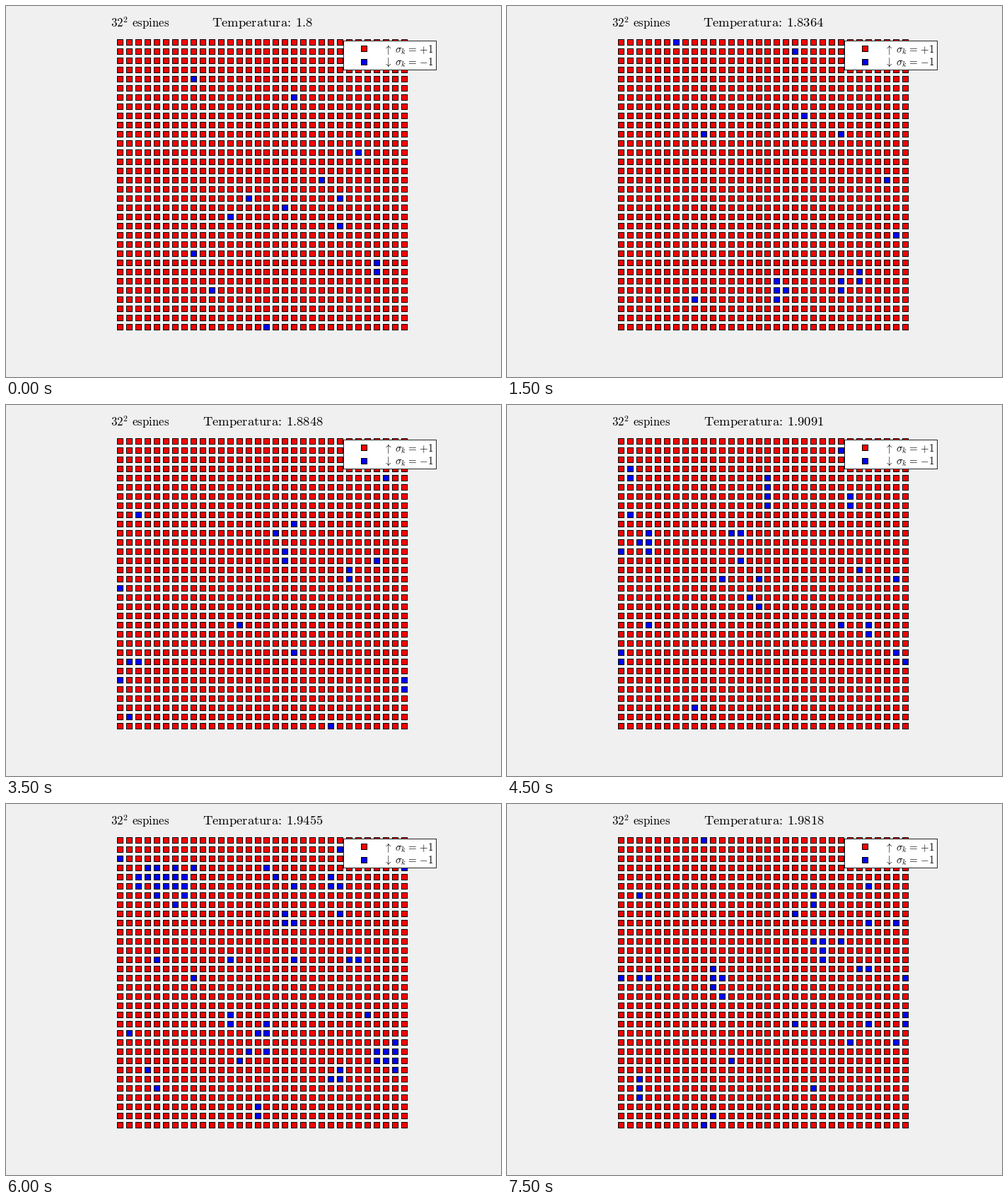
A matplotlib script for the animation above (8000 ms loop, 700x525 px).

```python
import numpy as np
import matplotlib.pyplot as plt
from matplotlib.animation import FuncAnimation
from matplotlib.collections import PolyCollection

W, H, DPI = 700, 525, 100
N, FRAMES, INTERVAL, SWEEPS = 32, 16, 500, 40
BG, RED, BLUE = "#f0f0f0", "#ff0000", "#0000ff"

plt.rcParams["mathtext.fontset"] = "cm"

# (column, row) of the spins that point down at the start
START_DOWN = [(8, 4), (19, 6), (26, 12), (22, 15), (14, 17), (24, 17), (18, 18),
              (12, 19), (24, 20), (8, 23), (28, 24), (28, 25), (10, 27), (16, 31)]


def temperature(k):
    return 1.8 + 1.2 * k / 99


def sweep(spins, temp, rng):
    """One heat-bath pass over both sublattices of a periodic lattice."""
    parity = np.indices(spins.shape).sum(axis=0) % 2
    for p in (0, 1):
        field = sum(np.roll(spins, d, axis) for d in (1, -1) for axis in (0, 1))
        up = rng.random(spins.shape) < 1 / (1 + np.exp(-2 * field / temp))
        spins = np.where(parity == p, np.where(up, 1, -1), spins)
    return spins


def simulate():
    rng = np.random.default_rng(32)
    spins = np.ones((N, N), int)
    for col, row in START_DOWN:
        spins[row, col] = -1
    states = [spins]
    for k in range(1, FRAMES):
        for _ in range(SWEEPS):
            spins = sweep(spins, temperature(k), rng)
        states.append(spins)
    return states


def box(x0, y0, x1, y1):
    return [(x0, y0), (x1, y0), (x1, y1), (x0, y1)]


def square(x, y, r):
    """Pixel-aligned square reaching r pixels around pixel (x, y)."""
    return box(x - r, y - r, x + r + 1, y + r + 1)


def fill(polys, color, z):
    return ax.add_collection(
        PolyCollection(polys, facecolors=color, edgecolors="none", linewidths=0, zorder=z),
        autolim=False)


def label(x, y, s, px, **kw):
    return ax.text(x, y, s, fontsize=px * 72 / DPI, color="black",
                   va="baseline", zorder=6, **kw)


def title_text(k):
    return (r"$\mathrm{Temperatura\hspace{-0.2}:\hspace{0.2}%s}$"
            % f"{temperature(k):.5g}")


fig = plt.figure(figsize=(W / DPI, H / DPI), dpi=DPI, facecolor=BG)
ax = fig.add_axes([0, 0, 1, 1])
ax.set(xlim=(0, W), ylim=(H, 0))
ax.axis("off")

centers = [(161 + round(402 / 31 * c), 51 + 13 * r) for r in range(N) for c in range(N)]
fill([square(x, y, 4) for x, y in centers], "black", 1)
cells = fill([square(x, y, 3) for x, y in centers], RED, 2)

title = label(363, 29.5, title_text(0), 18.6, ha="center")
label(148.5, 30, r"$\mathrm{32^2\hspace{0.4}espines}$", 16.8, ha="left")

# Legend
fill([box(477, 49, 609, 91)], "#262626", 3)
fill([box(478, 50, 608, 90)], "white", 4)
for y, base, color, arrow, value in ((60, 66, RED, "uparrow", "{+}1"),
                                     (79, 84, BLUE, "downarrow", "{-}1")):
    fill([square(506, y, 4)], "black", 5)
    fill([square(506, y, 3)], color, 6)
    label(540, base, rf"$\{arrow}$", 15, ha="center")
    label(549.5, base, rf"$\sigma_k\hspace{{0.1}}=\hspace{{0.1}}{value}$", 15, ha="left")

states = simulate()


def update(k):
    cells.set_facecolor([RED if s > 0 else BLUE for s in states[k].ravel()])
    title.set_text(title_text(k))
    return cells, title


anim = FuncAnimation(fig, update, frames=FRAMES, interval=INTERVAL, repeat=True)
plt.show()
```
